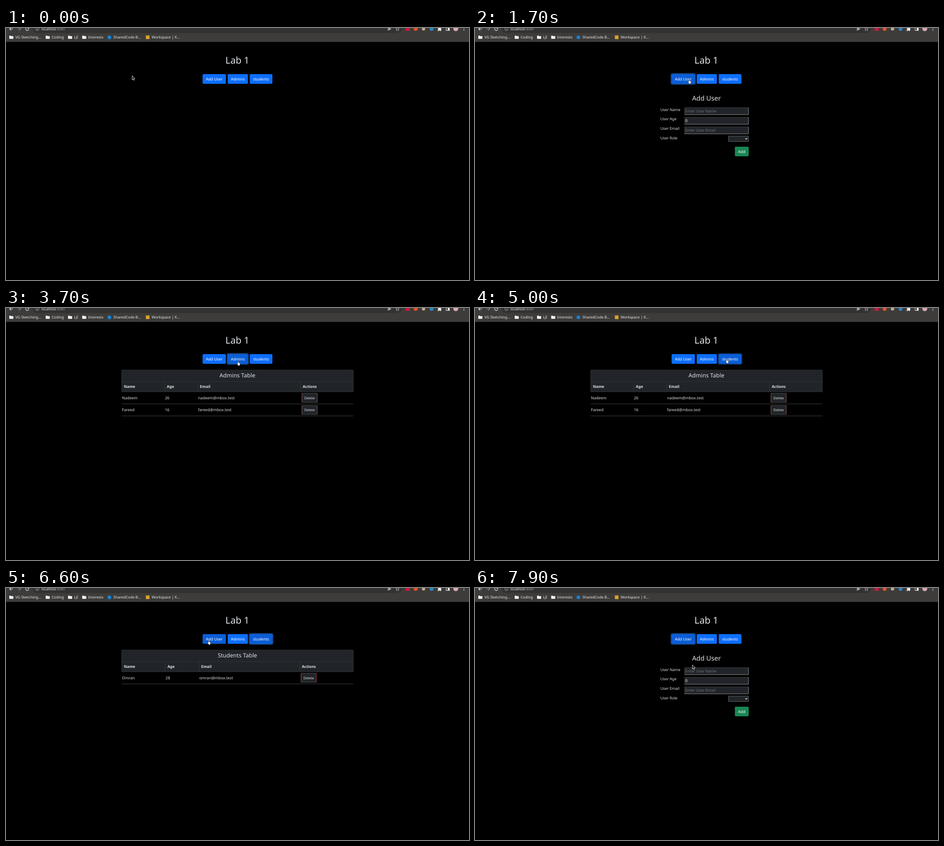
Recreate the animation shown at these times as an HTML page. Size 1015 by 552 pixels, loop 8 s.

```html
<!DOCTYPE html>
<html lang="en">
<head>
<meta charset="utf-8">
<title>Lab 1</title>
<style>
html, body { margin: 0; width: 100%; height: 100%; overflow: hidden; background: #000; }
svg { display: block; width: 100vw; height: 100vh; }
text { font-family: "Noto Sans", "Open Sans", sans-serif; font-size: 8.5px; fill: #dee2e6; text-rendering: geometricPrecision; white-space: pre; }
</style>
</head>
<body>
<svg id="stage" viewBox="0 0 1015 552"></svg>
<script>
const LOOP = 8000;
const BLUE = '#0d6efd', BLUE_DARK = '#0b5ed7', PANEL = '#212529', LINE = '#373b3e';

const rect = (x, y, w, h, fill, extra = '') =>
  `<rect x="${x}" y="${y}" width="${w}" height="${h}" fill="${fill}" ${extra}/>`;
const text = (x, y, str, extra = '') => `<text x="${x}" y="${y}" ${extra}>${str}</text>`;
const mid = (x, y, str, extra = '') => text(x, y, str, 'text-anchor="middle" ' + extra);
const path = (d, extra) => `<path d="${d}" ${extra}/>`;
const dot = (x, y, r, fill) => `<circle cx="${x}" cy="${y}" r="${r}" fill="${fill}"/>`;
const size = (px, weight = 400) => `style="font-size:${px}px;font-weight:${weight}"`;
const stroke = (color, w = 1) => `fill="none" stroke="${color}" stroke-width="${w}"`;

function browserBar() {
  const folder = x => path(`M${x} 17.5q0-.8.8-.8h2.4l1 1.1h4q.8 0 .8.8v4.4q0 .8-.8.8h-7.4q-.8 0-.8-.8z`, 'fill="#f2f2f2"');
  const label = (x, str) => text(x, 23.2, str, 'style="font-size:8.1px;fill:#e8e8e8"');
  const icon = stroke('#e6e6e6', 1.2);
  return rect(0, 0, 1015, 30.5, '#3d3c3a') +
    rect(58, -12, 810, 23, '#333231', 'rx="11"') +
    path('M15.5 2H8.5M11.5-1.5L8 2l3.5 3.5', icon) +
    path('M25 2h7.5M29-1.5L32.5 2 29 5.5', stroke('#8a8987', 1.1)) +
    path('M49.5 0.2A3.4 3.4 0 1 0 50 3M50-2v2.8h-2.8', icon) +
    `<circle cx="68.7" cy="2.3" r="3.4" ${stroke('#b5b5b5', .8)}/>` +
    path('M68.7 1.8v2.4M68.7 0v.9', stroke('#b5b5b5', .9)) +
    text(77.5, 5.2, 'localhost<tspan fill="#9a9a9a">:8080</tspan>', 'style="font-size:7.6px;fill:#eee"') +
    path('M837-1.2l8 3.4-8 3.5v-2.7l4.5-.8-4.5-.8z', 'fill="#c4c4c4"') +
    path('M858.3-1.6l1.1 2.6 2.8.2-2.1 1.9.6 2.8-2.4-1.5-2.4 1.5.6-2.8-2.1-1.9 2.8-.2z', stroke('#d0d0d0', .8)) +
    rect(876, -2, 9, 8, '#d5153c') +
    dot(898, 2, 4.4, '#e8502a') + dot(915.3, 2, 3.6, '#c9a98c') + dot(933, 2, 4.4, '#2b86c5') +
    path('M946.5-1h2.2a1.4 1.4 0 0 1 2.8 0h2.2v2.5a1.4 1.4 0 0 1 0 2.6v2.4h-2.3a1.3 1.3 0 0 0-2.6 0h-2.3v-2.6a1.3 1.3 0 0 0 0-2.6z', 'fill="#eee"') +
    rect(965, -1.5, 7, 7, 'none', 'stroke="#eee" stroke-width="1"') + rect(968.5, -1.5, 3.5, 7, '#eee') +
    dot(986, 1.5, 5.4, '#d9a9b5') +
    [-.8, 2.2, 5.2].map(y => dot(1003.8, y, .9, '#e0e0e0')).join('') +
    [7.2, 87, 136, 167].map(folder).join('') +
    label(20.5, 'VG Sketching…') + label(100, 'Coding') + label(149, 'LJI') + label(180, 'Interests') +
    dot(226.6, 20.5, 4, '#1583d8') + label(235.5, 'SharedCode B…') +
    rect(306.6, 16.3, 8, 8, '#dca22c') + label(319.3, 'Workspace | K…');
}

const BUTTONS = {
  add: [431, 51, 'Add User'],
  admins: [486, 44.3, 'Admins'],
  students: [534.3, 49.7, 'students']
};

function navButton(id) {
  const [x, w, str] = BUTTONS[id];
  return `<g id="${id}">` +
    rect(x - 1, 100, w + 2, 23.2, 'none', 'class="ring" rx="3" stroke="#18427f" stroke-width="2.2"') +
    rect(x, 101, w, 21.2, BLUE, 'class="face" rx="2.2"') +
    mid(x + w / 2, 114.8, str, 'fill="#fff" style="fill:#fff"') + '</g>';
}

function form() {
  const field = (y, str, color) =>
    rect(459, y, 141, 16.3, PANEL) +
    path(`M459.5 ${y + 16}V${y + .5}H600`, stroke('#3a3d41', 1)) +
    path(`M459 ${y + 15.8}H599.5V${y}`, stroke('#85878a', 1)) +
    text(461, y + 11.2, str, `style="fill:${color}"`);
  const labels = ['User Name', 'User Age', 'User Email', 'User Role'];
  return mid(507.5, 158.8, 'Add User', size(14.6, 500)) +
    labels.map((s, i) => text(406.5, 181.5 + i * 20.9, s, size(8.3))).join('') +
    field(174, 'Enter User Name', '#6f747a') +
    field(195, '0', '#fff') +
    field(216, 'Enter User Email', '#6f747a') +
    rect(555.7, 236.8, 43.8, 11.6, PANEL, 'stroke="#777" stroke-width=".8"') +
    path('M592.3 241.4l2.3 2.3 2.3-2.3', stroke('#fff', 1.1)) +
    rect(569.7, 260, 30.3, 21, '#198754', 'rx="2.2"') +
    mid(584.8, 273.5, 'Add', 'style="fill:#fff"');
}

function table(title, cols, rows, edge) {
  const heads = ['Name', 'Age', 'Email', 'Actions'];
  const box = stroke(LINE, .8);
  let s = rect(253.5, 135.8, 508, 48, PANEL) +
    path('M253.7 135.9H761.3V183.6H253.7zM253.7 161H761.3', box) +
    cols.slice(1).map(x => path(`M${x} 161V183.6`, box)).join('') +
    mid(507.3, 152.2, title, size(12.5, 500)) +
    heads.map((h, i) => text(cols[i] + 4.6, 175.3, h, size(8.3, 700))).join('');
  rows.forEach((cells, r) => {
    const y = 183.6 + r * 26.4, bx = cols[3] + 3;
    s += cells.map((c, i) => text(cols[i] + .5, y + 16.2, c)).join('') +
      path(`M253.5 ${y + 26.4}H761.5`, stroke('#4d5154', .8)) +
      rect(bx, y + 3.2, 33.5, 20, PANEL, 'stroke="#5c5558" stroke-width=".8"') +
      path(`M${bx} ${y + 3.2}v20M${bx + 33.5} ${y + 3.2}v20`, stroke(edge, .9)) +
      mid(bx + 16.7, y + 15.9, 'Delete', size(7.6));
  });
  return s;
}

const view = (id, body) => `<g id="${id}" class="view">${body}</g>`;
const stage = document.getElementById('stage');
stage.innerHTML = browserBar() +
  mid(507.2, 78.4, 'Lab 1', size(20.6, 500)) +
  Object.keys(BUTTONS).map(navButton).join('') +
  view('formView', form()) +
  view('adminView', table('Admins Table', [253.8, 348, 420.5, 645.8],
    [['Nadeem', '26', 'nadeem@mbox.test'], ['Fareed', '16', 'fareed@mbox.test']], '#84434b')) +
  view('studentView', table('Students Table', [253.8, 349.3, 423.2, 643.8],
    [['Omran', '28', 'omran@mbox.test']], '#a8303c')) +
  `<g id="arrow">${path('M.6.6V9.2L2.5 7.5 3.8 10.5 5.3 9.8 4 6.9H6.6z', 'fill="#111" stroke="#e8e8e8" stroke-width=".9"')}</g>` +
  `<g id="hand">${path('M1.9 1.2Q1.9.4 2.6.4T3.3 1.2V3.8Q4.2 3.3 4.6 4.1 5.4 3.7 5.8 4.5 6.8 4.2 6.9 5.2V7.2Q6.8 8.3 6.2 9V10.2H2.7V9.2L.5 6.5Q.1 5.6 1 5.5L1.9 6.2z', 'fill="#fff" stroke="#222" stroke-width=".6"')}</g>`;

// Pointer steps: time, x, y, hovered button ('' shows the arrow)
const POINTER = [
  [0, 276, 104, ''], [200, 320, 108, ''], [300, 410, 110, ''], [400, 471, 111, 'add'],
  [600, 474, 107, 'add'], [700, 495, 103, 'admins'], [800, 483, 98, ''], [900, 476, 109, 'add'],
  [1300, 464, 112, 'add'], [1400, 466.5, 112, 'add'],
  [2100, 474, 108, 'add'], [2200, 487, 107, 'admins'], [2300, 497, 109, 'admins'], [2400, 499, 110, 'admins'],
  [2800, 487, 110, 'admins'], [2900, 521, 112, 'admins'],
  [3300, 514, 113, 'admins'], [3400, 508, 115, 'admins'], [3500, 503, 116, 'admins'], [3600, 500, 116, 'admins'],
  [3700, 506, 116, 'admins'], [3800, 513, 114, 'admins'], [3900, 520, 108, 'admins'], [4000, 526, 102, 'admins'],
  [4100, 532, 101, ''], [4200, 535, 102, 'students'], [4300, 542, 105, 'students'], [4400, 548, 109, 'students'],
  [4500, 549, 111, 'students'], [5400, 575, 112, 'students'], [5600, 560, 114, 'students'],
  [5700, 522, 115, 'admins'], [5800, 483, 115, ''], [5900, 446, 115, 'add'], [6000, 431, 114, 'add'],
  [6200, 434, 114, 'add'], [6400, 437, 114, 'add'], [6500, 440, 114, 'add'], [6600, 441.5, 114, 'add'],
  [7900, 476, 168, '']
];
// Page steps: time, focused button, ring strength, visible view
const PAGE = [
  [0, '', 0, ''], [1600, 'add', .6, ''], [1700, 'add', 1, 'formView'],
  [2500, 'admins', .6, 'formView'], [2600, 'admins', 1, 'adminView'],
  [4900, 'students', .3, 'adminView'], [5000, 'students', .7, 'adminView'], [5100, 'students', 1, 'studentView'],
  [7400, 'add', .3, 'studentView'], [7500, 'add', .7, 'studentView'], [7600, 'add', 1, 'formView']
];

const at = (steps, t) => steps.filter(s => s[0] <= t).pop();
const show = (el, on) => el.setAttribute('visibility', on ? 'visible' : 'hidden');
const byId = id => document.getElementById(id);
const views = [...document.querySelectorAll('.view')];
const buttons = Object.keys(BUTTONS).map(id => ({
  id, face: byId(id).querySelector('.face'), ring: byId(id).querySelector('.ring')
}));
const arrow = byId('arrow'), hand = byId('hand');

function render(t) {
  const [, x, y, hover] = at(POINTER, t);
  const [, focus, glow, open] = at(PAGE, t);
  for (const b of buttons) {
    b.face.setAttribute('fill', b.id === hover || b.id === focus ? BLUE_DARK : BLUE);
    b.ring.setAttribute('stroke-opacity', b.id === focus ? glow : 0);
  }
  views.forEach(v => show(v, v.id === open));
  show(arrow, !hover);
  show(hand, hover);
  (hover ? hand : arrow).setAttribute('transform', `translate(${x} ${y})`);
}

const start = performance.now();
function tick() {
  render((performance.now() - start) % LOOP);
  requestAnimationFrame(tick);
}
tick();
</script>
</body>
</html>
```
